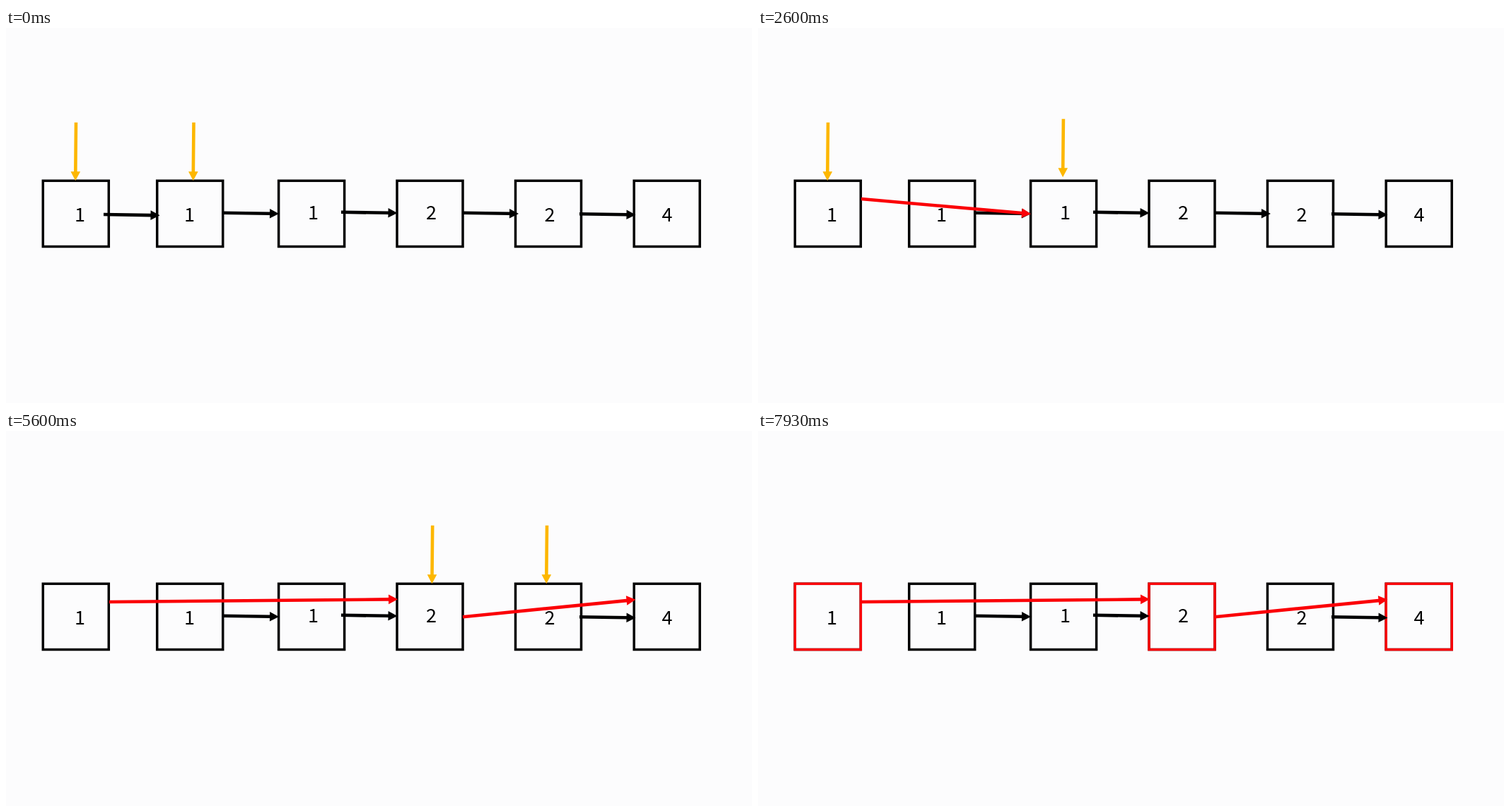
Animation of 1055x531 px, one loop 7.99 s. Source, as an HTML page:

```html
<!DOCTYPE html>
<html lang="en">
<head>
<meta charset="utf-8">
<title>Removing duplicates from a linked list</title>
<style>
  html, body { margin: 0; width: 100%; height: 100%; overflow: hidden; background: #fcfcfd; }
  svg { display: block; width: 100%; height: 100%; }
  text { font: 27px "Noto Sans CJK SC", "Noto Sans CJK", "Noto Sans CJK JP", "Open Sans", sans-serif; text-anchor: middle; fill: #000; }
</style>
</head>
<body>
<svg id="stage" viewBox="0 0 1055 531"></svg>
<script>
const LOOP = 7990;
const BLACK = '#000', RED = '#fb0007', AMBER = '#fdb700';
const stage = document.getElementById('stage');

// Cross-fades between successive states: [start, end]
const LINK = [70, 770], STEP = [1640, 2250], RELINK = [2600, 3270], NEXT = [3600, 4270],
      ADVANCE = [4600, 5270], LAST = [6600, 7270], RESULT = [7680, 7930];
const faders = [];

function add(tag, attrs, text) {
  const el = document.createElementNS('http://www.w3.org/2000/svg', tag);
  for (const key in attrs) el.setAttribute(key, attrs[key]);
  if (text) el.textContent = text;
  stage.appendChild(el);
  return el;
}

function fade(el, from, to) {
  if (from || to) faders.push({ el, from, to });
}

function box(x, color) {
  return add('rect', { x, y: 216.3, width: 93, height: 93.2, fill: 'none', stroke: color, 'stroke-width': 3.5 });
}

function arrow(color, x1, y1, x2, y2, from, to) {
  const length = Math.hypot(x2 - x1, y2 - y1);
  const angle = Math.atan2(y2 - y1, x2 - x1) * 180 / Math.PI;
  const neck = length - 13;
  const d = `M0-2.3H${neck}V-6.8L${length} 0L${neck} 6.8V2.3H0Z`;
  fade(add('path', { d, fill: color, transform: `translate(${x1} ${y1}) rotate(${angle})` }), from, to);
}

function pointer(x, y, from, to) {
  arrow(AMBER, x, y, x - 0.8, y + 82.5, from, to);
}

// Nodes: left edge, digit, digit centre, baseline, kept in the result
const nodes = [
  [52.3, 1, 104.5, 273.5, true],
  [213.7, 1, 259.5, 273.5, false],
  [385.6, 1, 434.5, 270.5, false],
  [553, 2, 601.5, 270.5, true],
  [720.5, 2, 769, 274, false],
  [888.2, 4, 935, 273.5, true]
];
for (const [x, digit, cx, baseline, kept] of nodes) {
  box(x, BLACK);
  if (kept) fade(box(x, RED), RESULT);
  add('text', { x: cx, y: baseline }, String(digit));
}

arrow(BLACK, 138, 264, 217.5, 265.3, null, LINK);
arrow(BLACK, 307, 261.8, 386, 263);
arrow(BLACK, 474, 260.8, 553.5, 262);
arrow(BLACK, 646, 261.8, 725, 263, null, ADVANCE);
arrow(BLACK, 811, 263.2, 890.5, 264.5);

arrow(RED, 146, 242, 386, 263.2, LINK, RELINK);
arrow(RED, 146, 242, 554, 238.3, RELINK);
arrow(RED, 646, 263.2, 890.5, 238.8, ADVANCE);

pointer(99, 133.7, null, ADVANCE);
pointer(265.5, 133.7, null, STEP);
pointer(431.9, 128.7, STEP, NEXT);
pointer(597.5, 128.7, NEXT, ADVANCE);
pointer(603.2, 133.7, ADVANCE, RESULT);
pointer(765, 133.7, ADVANCE, LAST);
pointer(943, 133.7, LAST, RESULT);

function progress(t, span) {
  return Math.min(1, Math.max(0, (t - span[0]) / (span[1] - span[0])));
}

function draw(t) {
  for (const { el, from, to } of faders) {
    const shown = from ? progress(t, from) : 1;
    const gone = to ? progress(t, to) : 0;
    el.setAttribute('opacity', shown * (1 - gone));
  }
}

const begin = performance.now();
function tick() {
  draw((performance.now() - begin) % LOOP);
  requestAnimationFrame(tick);
}
tick();
</script>
</body>
</html>
```
